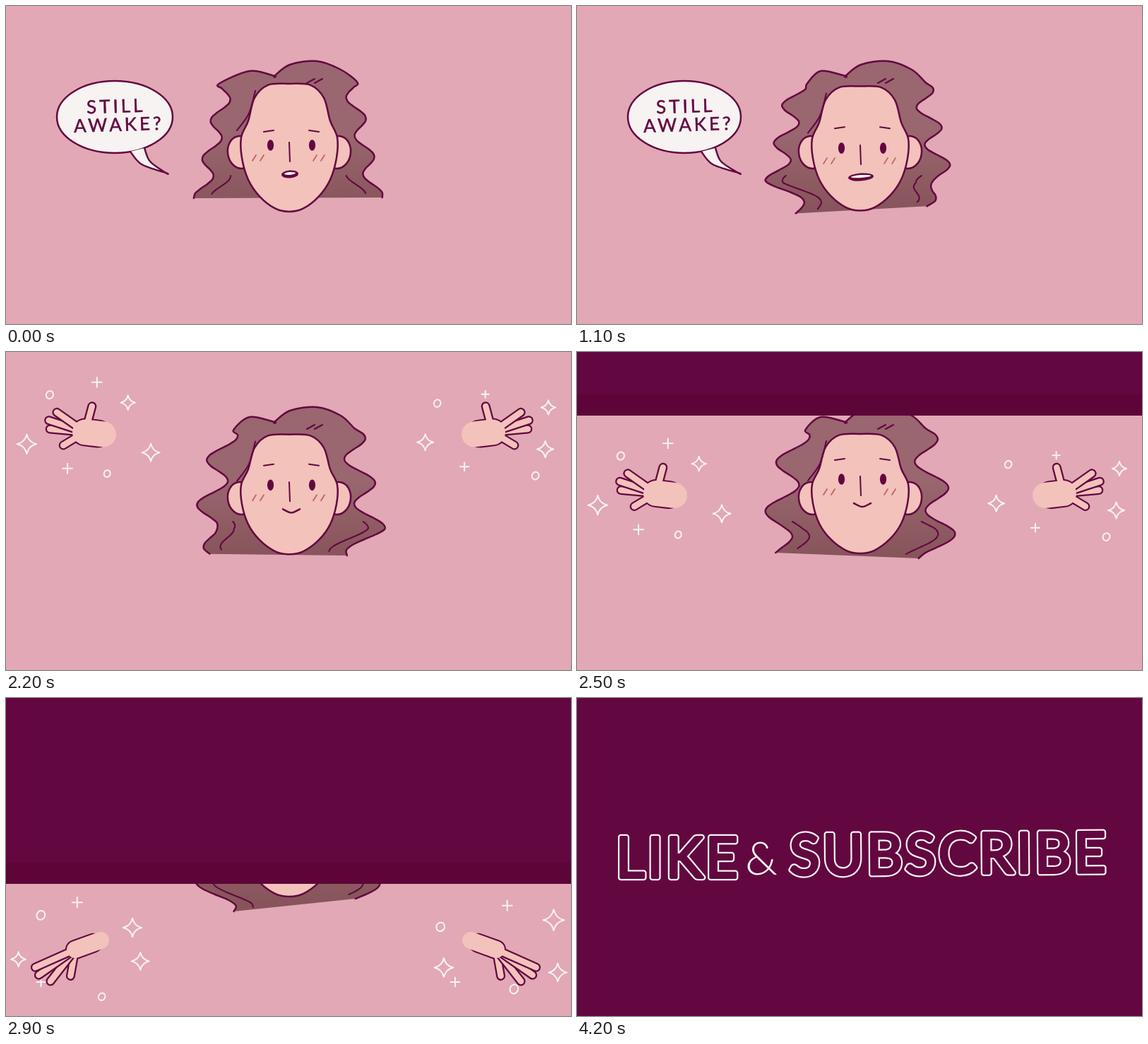
Animation, 800 px wide and 450 px high, one loop 4300 ms. Source, as an HTML page with a canvas:

```html
<!DOCTYPE html>
<html lang="en">
<head>
<meta charset="utf-8">
<title>Still awake?</title>
<style>
html, body { margin: 0; width: 100%; height: 100%; overflow: hidden; background: #e2a8b5; }
canvas { display: block; width: 800px; height: 450px; }
</style>
</head>
<body>
<canvas id="stage" width="800" height="450" role="img" aria-label="Still awake? Like &amp; subscribe"></canvas>
<script>
const ctx = document.getElementById('stage').getContext('2d');
const LOOP = 4300, STEP = 100, TAU = Math.PI * 2;
const PINK = '#e2a8b5', INK = '#630740', SKIN = '#f2c2bb', PAPER = '#f7f3f2', BLUSH = '#c4625c';

// Head poses. peakL and peakR: first hair wave on each side, gap: distance to the next,
// tuck: how far the tips turn in, endL and endR: height of the tips
const poses = [
  { at: 0, top: 110, chin: 291, eye: 197, lift: 20, peakL: 107, peakR: 104, gap: 54, amp: 11, tuck: 0, endL: 272, endR: 271 },
  { at: 700, top: 110, chin: 290, eye: 198, lift: 28, peakL: 136, peakR: 118, gap: 53, amp: 15, tuck: 50, endL: 297, endR: 286 },
  { at: 1600, top: 118, chin: 289, eye: 205, lift: 30, peakL: 145, peakR: 118, gap: 53, amp: 15, tuck: 50, endL: 289, endR: 280 },
  { at: 2500, top: 116, chin: 285, eye: 180, lift: 28, peakL: 155, peakR: 122, gap: 69, amp: 20, tuck: 25, endL: 284, endR: 292 },
  { at: 2900, top: 113, chin: 281, eye: 176, lift: 28, peakL: 195, peakR: 130, gap: 68, amp: 20, tuck: 35, endL: 302, endR: 284 }
];

// Half of the face: distance from the middle, share of the height
const jaw = [[30, 0.01], [49, 0.11], [58, 0.29], [68, 0.42], [67, 0.58], [58, 0.75], [42, 0.88], [20, 0.975]];
const crown = [[345, 92], [380, 99], [380, 99], [402, 83], [440, 78], [474, 90]];

// Hands: palm, wrist and fingers as [degrees below left, length]
const hands = [
  { x: 112, y: 200, wrist: [26, 3], palm: 36, rest: 0, mirror: 801,
    fingers: [[-105, 38], [31, 36], [-5, 50], [-18, 54], [-35, 49]] },
  { x: 98, y: 356, wrist: [36, -13], palm: 24, rest: 173, mirror: 792,
    fingers: [[80, 38], [52, 57], [35, 63], [24, 62]] }
];

const clamp = v => Math.max(0, Math.min(1, v));
const lerp = (a, b, u) => a + (b - a) * u;

function random(seed) {
  return () => {
    const v = Math.sin(seed++ * 127.1) * 43758.5453;
    return v - Math.floor(v);
  };
}

function fill(p, color) {
  ctx.fillStyle = color;
  ctx.fill(p);
}

function stroke(p, color = INK, width = 2.5) {
  ctx.strokeStyle = color;
  ctx.lineWidth = width;
  ctx.stroke(p);
}

function shape(p, color) {
  fill(p, color);
  stroke(p);
}

function line(x0, y0, x1, y1) {
  const p = new Path2D();
  p.moveTo(x0, y0);
  p.lineTo(x1, y1);
  return p;
}

function oval(x, y, rx, ry, turn = 0) {
  const p = new Path2D();
  p.ellipse(x, y, rx, ry, turn, 0, TAU);
  return p;
}

// Smooth curve through points
function curve(pts, closed) {
  const n = pts.length, p = new Path2D();
  const at = i => pts[closed ? (i + n) % n : Math.max(0, Math.min(n - 1, i))];
  p.moveTo(...pts[0]);
  for (let i = 0; i < (closed ? n : n - 1); i++) {
    const [a, b, c, d] = [at(i - 1), at(i), at(i + 1), at(i + 2)];
    p.bezierCurveTo(b[0] + (c[0] - a[0]) / 6, b[1] + (c[1] - a[1]) / 6,
      c[0] - (d[0] - b[0]) / 6, c[1] - (d[1] - b[1]) / 6, c[0], c[1]);
  }
  return p;
}

function poseAt(t) {
  let i = 0;
  while (i < poses.length - 2 && t >= poses[i + 1].at) i++;
  const a = poses[i], b = poses[i + 1], u = clamp((t - a.at) / (b.at - a.at)), pose = {};
  for (const k in a) pose[k] = lerp(a[k], b[k], u);
  return pose;
}

// One side of the hair between two heights; waves widen towards the tips
function lock(pose, side, from, to, inset = 0) {
  const peak = side < 0 ? pose.peakL : pose.peakR, pts = [];
  for (let i = 0; i <= 24; i++) {
    const y = lerp(from, to, i / 24);
    const reach = 87 + 0.22 * (y - 105) + pose.amp * Math.cos(TAU * (y - peak) / pose.gap) - pose.tuck * clamp((y - 250) / 40);
    pts.push([400 + side * (reach - inset), y]);
  }
  return pts;
}

function drawHair(pose) {
  const left = lock(pose, -1, pose.endL, 110), right = lock(pose, 1, 108, pose.endR);
  const shade = ctx.createLinearGradient(0, 180, 0, 290);
  shade.addColorStop(0, '#9a666f');
  shade.addColorStop(1, '#87545b');
  shape(curve([...left, ...crown, ...right]), shade);
  for (const [side, end] of [[-1, pose.endL], [1, pose.endR]])
    stroke(curve(lock(pose, side, 240, end - 6, 24)), INK, 2.1);
}

function drawFace(pose) {
  const half = side => jaw.map(([w, v]) => [401 + side * w, lerp(pose.top, pose.chin, v)]);
  const outline = [...half(1), [401, pose.chin], ...half(-1).reverse(), [401, pose.top]];
  for (const side of [-1, 1]) shape(oval(401 + side * 69, 207, 18, 23, side * 0.15), SKIN);
  shape(curve(outline, true), SKIN);
  stroke(curve([[353, pose.top + 10], [344, pose.top + 42], [327, pose.top + 66]]), INK, 2.1);
  for (const x of [426, 437]) stroke(line(x, 109, x + 11, 103), INK, 2.1);
}

function drawFeatures(pose, step) {
  const { eye, lift } = pose, mid = 404;
  for (const side of [-1, 1]) {
    fill(oval(mid + side * 29.5, eye, 4.6, 7.8), INK);
    const brow = mid + side * 32, y = eye - lift;
    stroke(line(brow - 7, y - side, brow + 7, y + side), INK, 2);
    for (const x of [-5, 6]) {
      const foot = mid - 5 + side * 43 + x;
      stroke(line(foot - 2, eye + 22, foot + 3, eye + 14), BLUSH, 1.8);
    }
  }
  stroke(line(401, eye - 4, 402, eye + 23), INK, 2);
  if (step >= 12) return stroke(curve([[mid - 12, eye + 34], [mid, eye + 39], [mid + 12, eye + 34]]));
  const wide = (step >> 1) % 2 ? 18 : 12;
  fill(oval(402, eye + 41, wide, 5.5, -0.07), INK);
  fill(oval(402, eye + 40, wide - 4, 2, -0.07), PAPER);
}

function drawBubble(step) {
  const alt = (step >> 1) % 2;
  shape(oval(154 - 2 * alt, 157, 82 - 2 * alt, 51), PAPER);
  shape(curve([[176, 206], [192, 224], [226 + 2 * alt, 236], [226 + 2 * alt, 236], [204, 220], [196, 201]]), PAPER);
  ctx.font = '400 26px Lato, sans-serif';
  ctx.letterSpacing = '4px';
  ctx.textAlign = 'center';
  ctx.fillStyle = ctx.strokeStyle = INK;
  ctx.lineWidth = 0.5;
  for (const [word, x, y] of [['STILL', 156, 151], ['AWAKE?', 160, 177]]) {
    ctx.save();
    ctx.translate(x - 2 * alt, y);
    ctx.rotate(-0.03);
    ctx.fillText(word, 0, 0);
    ctx.strokeText(word, 0, 0);
    ctx.restore();
  }
}

function drawSpark(kind, x, y, r) {
  if (kind === 1) return stroke(oval(x, y, r * 0.4, r * 0.45, 0.4), PAPER, 2);
  if (kind === 2) {
    stroke(line(x - r / 2, y, x + r / 2, y), PAPER, 2);
    return stroke(line(x, y - r / 2, x, y + r / 2), PAPER, 2);
  }
  const p = new Path2D();
  p.moveTo(x + r, y);
  for (let a = TAU / 4; a <= TAU; a += TAU / 4) {
    const c = a - TAU / 8;
    p.quadraticCurveTo(x + 0.25 * r * Math.cos(c), y + 0.25 * r * Math.sin(c), x + r * Math.cos(a), y + r * Math.sin(a));
  }
  p.closePath();
  stroke(p, PAPER, 2);
}

// Sparks on a loose ring around a hand
function drawSparks(x, y, seed) {
  const rnd = random(seed);
  for (let i = 0; i < 7; i++) {
    const a = (i + rnd() * 0.6) * TAU / 7, far = 0.9 + rnd() * 0.4;
    drawSpark(i % 3, x + 80 * far * Math.cos(a), y + 60 * far * Math.sin(a), 10 + rnd() * 5);
  }
}

function drawHand({ x, y, wrist, palm, fingers }) {
  stroke(line(x, y, x + wrist[0] * 0.7, y + wrist[1] * 0.7), INK, palm + 4);
  for (const [deg, length] of fingers) {
    const a = deg * TAU / 360;
    const finger = line(x, y, x - length * Math.cos(a), y + length * Math.sin(a));
    stroke(finger, INK, 13);
    stroke(finger, SKIN, 8.5);
  }
  stroke(line(x, y, x + wrist[0], y + wrist[1]), SKIN, palm);
}

const edgeAt = t => (t - 2292) * 0.4325 + Math.max(0, t - 2900) * 0.05;

function drawHands(t) {
  const pose = t < 2700 ? 0 : 1, hand = hands[pose];
  ctx.save();
  ctx.translate(0, edgeAt(Math.max(t, 2300)) - 90 - hand.rest);
  drawSparks(hand.x, hand.y, 3 + pose * 40);
  drawSparks(hand.mirror - hand.x, hand.y, 20 + pose * 40);
  drawHand(hand);
  ctx.transform(-1, 0, 0, 1, hand.mirror, 0);
  drawHand(hand);
  ctx.restore();
}

function drawCurtain(t) {
  const edge = edgeAt(t);
  ctx.fillStyle = INK;
  ctx.fillRect(0, 0, 800, edge);
  if (t >= 3800) return;
  const hem = Math.min(30, edge);
  ctx.fillStyle = '#5d0538';
  ctx.fillRect(0, Math.min(edge, 450) - hem, 800, hem);
}

// Hollow letters: a wide light stroke with a narrower dark one on top
function hollow(word, x, y, turn) {
  ctx.save();
  ctx.translate(x, y);
  ctx.rotate(turn);
  ctx.strokeStyle = PAPER;
  ctx.lineWidth = 8.5;
  ctx.strokeText(word, 0, 0);
  ctx.fillStyle = ctx.strokeStyle = INK;
  ctx.lineWidth = 4;
  ctx.strokeText(word, 0, 0);
  ctx.fillText(word, 0, 0);
  ctx.restore();
}

function drawTitle(t) {
  const shown = Math.ceil(((t - 3800) / STEP + 1) * 14 / 5);
  ctx.textAlign = 'left';
  ctx.letterSpacing = '4px';
  ctx.font = '400 79px Lato, sans-serif';
  hollow('LIKE'.slice(0, shown), 55, 254, 0);
  hollow('SUBSCRIBE'.slice(0, Math.max(0, shown - 5)), 301, 250, -0.008);
  if (shown < 5) return;
  ctx.font = '300 66px Lato, sans-serif';
  ctx.fillStyle = PAPER;
  ctx.fillText('&', 238, 250);
}

function draw(now) {
  const step = Math.floor(now % LOOP / STEP), t = step * STEP;
  ctx.fillStyle = PINK;
  ctx.fillRect(0, 0, 800, 450);
  if (t < 3300) {
    const pose = poseAt(t);
    drawHair(pose);
    drawFace(pose);
    drawFeatures(pose, step);
    if (t < 1200) drawBubble(step);
    if (t >= 2000) drawHands(t);
  }
  if (t >= 2300) drawCurtain(t);
  if (t >= 3800) drawTitle(t);
}

ctx.lineCap = ctx.lineJoin = 'round';
(function tick() {
  draw(performance.now());
  requestAnimationFrame(tick);
})();
</script>
</body>
</html>
```
